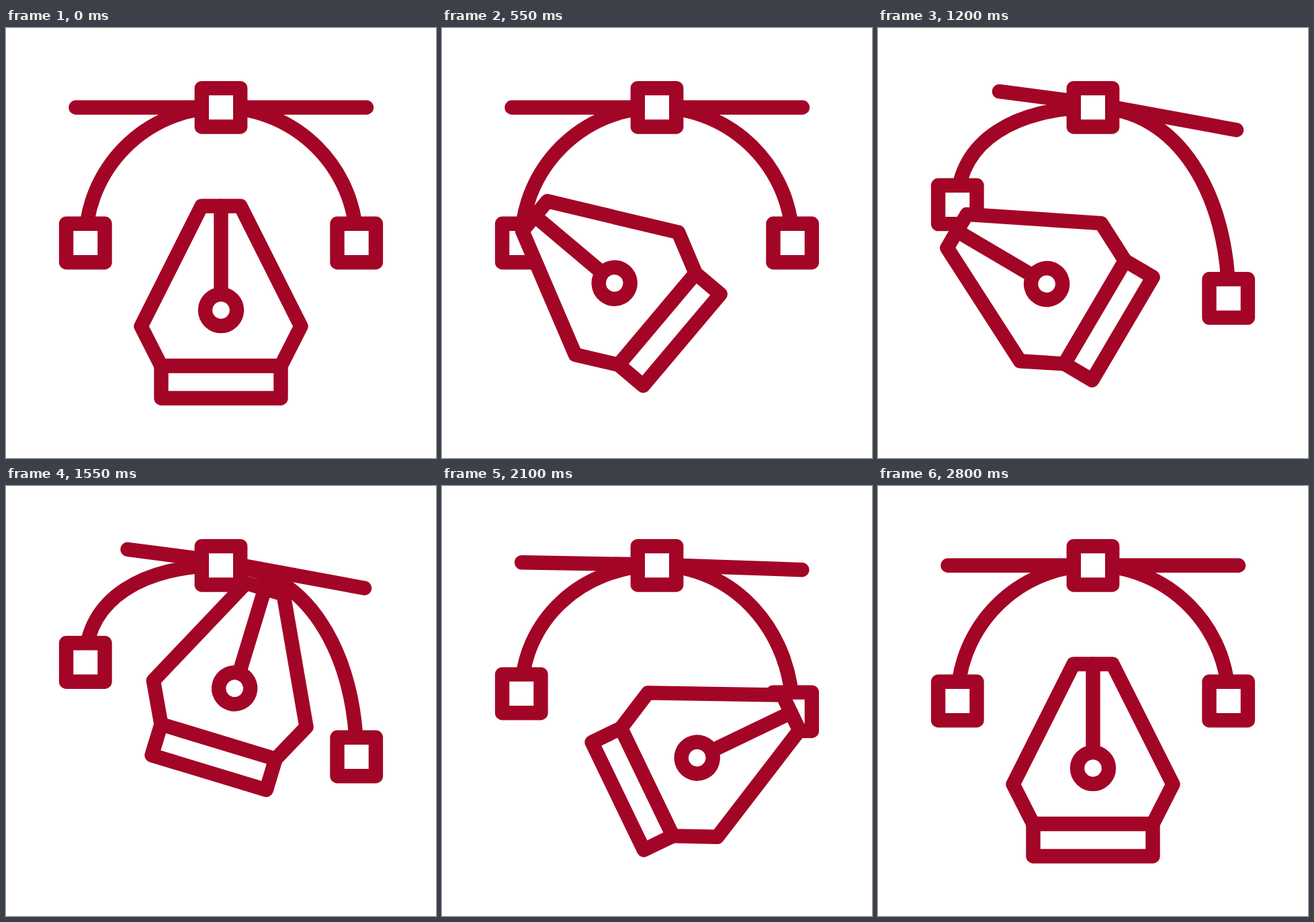
Recreate the animation shown at these times as an HTML page. Size 640 by 640 pixels, loop 3.6 s.

```html
<!DOCTYPE html>
<html lang="en">
<head>
<meta charset="utf-8">
<title>Pen tool</title>
<style>
  html, body { margin: 0; width: 100%; height: 100%; overflow: hidden; background: #fff; }
  svg { display: block; width: 100vw; height: 100vh; }
  g { fill: #fff; stroke: #a30526; stroke-width: 21.4; stroke-linecap: round; stroke-linejoin: round; }
  .open { fill: none; }
</style>
</head>
<body>
<svg viewBox="0 0 640 640">
  <defs><rect id="node" x="-28.7" y="-28.7" width="57.4" height="57.4"/></defs>
  <g>
    <path id="handle" class="open"/>
    <path id="curve" class="open"/>
    <use href="#node" x="320" y="118.3"/>
    <use id="left" href="#node" x="118.3"/>
    <use id="right" href="#node" x="521.7"/>
    <!-- the pen's origin is the middle of its lower edge -->
    <g id="pen">
      <path d="M-29-286H29L119-107L89-48H-89L-119-107Z"/>
      <path d="M-89-48H89V0H-89Z"/>
      <path d="M0-286V-155"/>
      <circle cy="-131" r="23.5"/>
    </g>
  </g>
</svg>
<script>
const LOOP = 3600, STEP = 50;
const el = id => document.getElementById(id);
const mix = (a, b, p) => a + (b - a) * p;
const bow = (a, via, b, p) => mix(mix(a, via, p), mix(via, b, p), p);

// Smooth progress from 0 to 1 between two times
function ease(t, start, end) {
  const u = Math.min(1, Math.max(0, (t - start) / (end - start)));
  return u * u * (3 - 2 * u);
}

const rest = { x: 320, y: 551, angle: 0 };
const atLeft = { x: 364, y: 447.5, angle: -59.5 };
const atRight = { x: 247, y: 447, angle: 80.5 };
const moves = [
  { start: 0, end: 738, from: rest, to: atLeft, via: { x: 342, y: 499 } },
  { start: 1245, end: 1820, from: atLeft, to: atRight, via: { x: 309.5, y: 405.5 } },
  { start: 1820, end: 2790, from: atRight, to: rest, via: { x: 283.5, y: 479 } }
];

function drawPen(t) {
  const { start, end, from, to, via } = moves.findLast(m => t >= m.start);
  const p = ease(t, start, end);
  const x = bow(from.x, via.x, to.x, p);
  const y = bow(from.y, via.y, to.y, p);
  el('pen').setAttribute('transform',
    `translate(${x} ${y}) rotate(${mix(from.angle, to.angle, p)})`);
}

function drawCurve(t) {
  const bend = ease(t, 776, 1222) - ease(t, 1790, 2220);
  const leftY = 320 - 57.5 * bend;
  const rightY = 320 + 83 * bend;
  const leftPull = leftY - mix(111.3, 97, bend);
  const rightPull = rightY - mix(111.3, 151, bend);

  el('left').setAttribute('y', leftY);
  el('right').setAttribute('y', rightY);
  el('curve').setAttribute('d',
    `M118.3 ${leftY}C118.3 ${leftPull} 208.7 118.3 320 118.3` +
    `C${mix(431.3, 448, bend)} 118.3 521.7 ${rightPull} 521.7 ${rightY}`);
  el('handle').setAttribute('d',
    `M${mix(104, 181, bend)} ${mix(118.3, 94.3, bend)}` +
    `L320 ${mix(118.3, 112.5, bend)}` +
    `L${mix(536.5, 533.5, bend)} ${mix(118.3, 152, bend)}`);
}

function frame() {
  const t = Math.floor(performance.now() % LOOP / STEP) * STEP;
  drawCurve(t);
  drawPen(t);
  requestAnimationFrame(frame);
}
frame();
</script>
</body>
</html>
```
